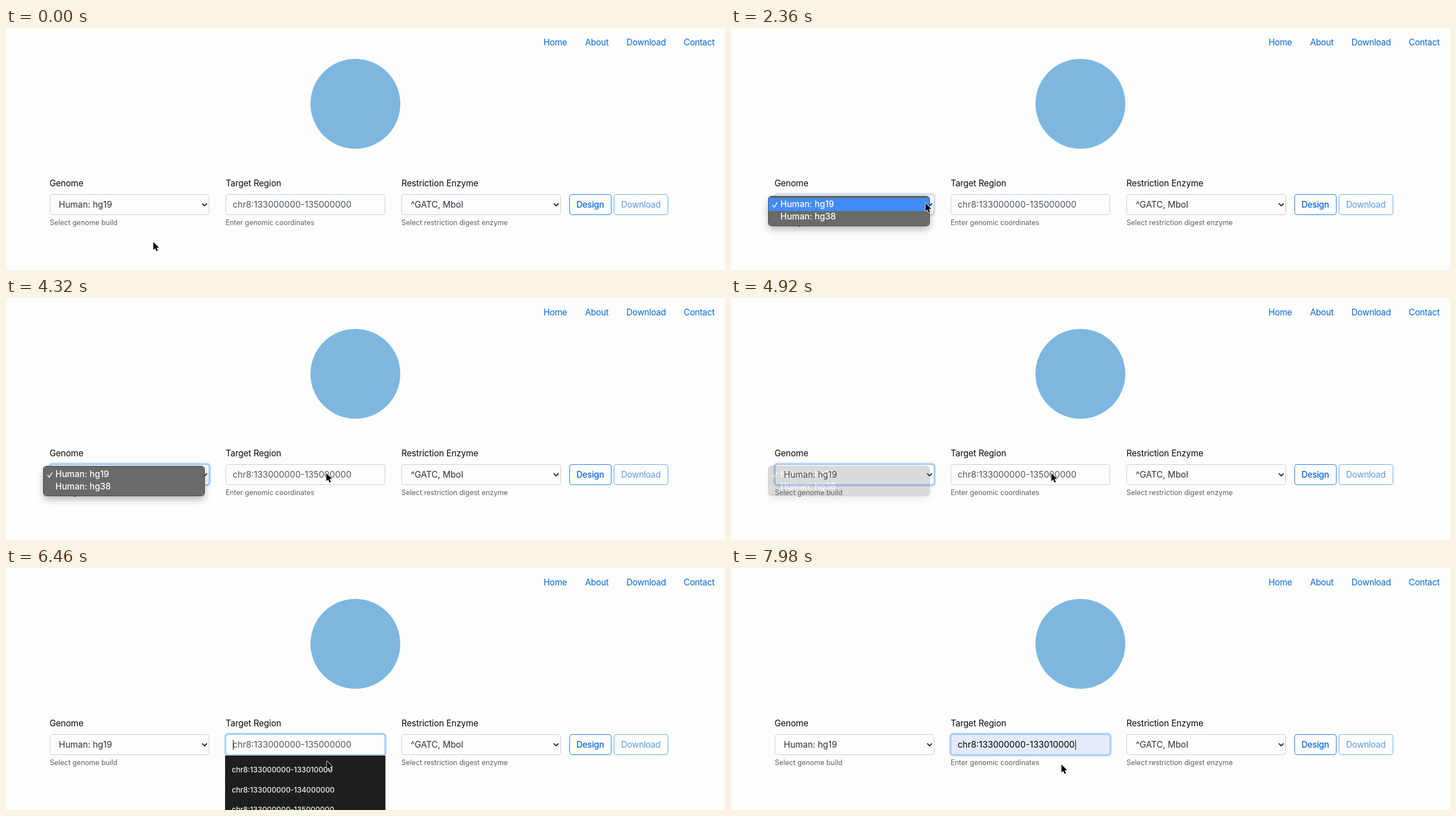
An HTML page for the animation above (8000 ms loop, 1280x431 px).

```html
<!DOCTYPE html>
<html lang="en">
<head>
<meta charset="utf-8">
<title>Probe design form</title>
<style>
  html, body { margin: 0; width: 100%; height: 100%; overflow: hidden; background: #fdfdfc; }
  svg { display: block; width: 100vw; height: 100vh; }
  text { font: 15.3px Inter, "Liberation Sans", sans-serif; letter-spacing: -.007em; fill: #07090c; white-space: pre; }
  .link { fill: #0668dc; letter-spacing: -.018em; }
  .strong { font-weight: 500; }
  .value { font-size: 15.4px; letter-spacing: 0; fill: #2c3238; }
  .hint { font-size: 12.5px; letter-spacing: -.02px; fill: #5a626b; }
  .placeholder { fill: #50575f; }
  .typed { fill: #000; }
  .item { font-size: 13px; font-weight: 500; letter-spacing: 0; fill: #f1f1f1; }
  .menu text { fill: #fff; font-weight: 500; letter-spacing: 0; }
  .box { fill: #fdfdfe; stroke: #c6ccd8; }
  .button { fill: none; stroke: #167df0; }
  .disabled { opacity: .65; }
  .line { fill: none; stroke-width: 2; stroke-linecap: round; stroke-linejoin: round; }

  /* every part shares one 8 s loop; 1% is 80 ms */
  .part { animation: 8s linear infinite; }
  .hard { animation-timing-function: step-end; }
  .pointer { animation-name: travel; animation-timing-function: ease-in-out; }
  .genome-focus { animation-name: genome-focus; }
  .region-focus { animation-name: region-focus; }
  .menu { animation-name: menu; }
  .marked { animation-name: marked; }
  .list { animation-name: list; }
  .empty { animation-name: empty; }
  .chosen { animation-name: chosen; }
  .waiting { animation-name: waiting; }
  .caret { animation: blink 1s step-end -.58s infinite; }

  @keyframes travel {
    0%, 1% { transform: translate(262px, 381px); }
    10%, 14% { transform: translate(330px, 323px); }
    20%, 41.5% { transform: translate(346px, 312px); }
    51%, 74% { transform: translate(570px, 312px); }
    79%, 84% { transform: translate(571px, 344px); }
    92%, 100% { transform: translate(588px, 350px); }
  }
  @keyframes genome-focus {
    0%, 28.75% { opacity: 0; }
    30.6%, 67.75% { opacity: 1; }
    69.6%, 100% { opacity: 0; }
  }
  @keyframes region-focus {
    0%, 67.75% { opacity: 0; }
    69.6%, 100% { opacity: 1; }
  }
  @keyframes menu {
    0%, 28.49% { opacity: 0; }
    28.5%, 60.25% { opacity: 1; }
    61.5% { opacity: .24; }
    63%, 100% { opacity: 0; }
  }
  @keyframes marked { 0% { opacity: 1; } 42.5%, 100% { opacity: 0; } }
  @keyframes list { 0% { opacity: 0; } 69.5% { opacity: 1; } 96.25%, 100% { opacity: 0; } }
  @keyframes empty { 0% { opacity: 1; } 96.25%, 100% { opacity: 0; } }
  @keyframes chosen { 0% { opacity: 0; } 96.25%, 100% { opacity: 1; } }
  @keyframes waiting { 0% { opacity: 0; } 67.75% { opacity: 1; } 96.25%, 100% { opacity: 0; } }
  @keyframes blink { 0% { opacity: 1; } 50%, 100% { opacity: 0; } }
</style>
</head>
<body>
<svg viewBox="0 0 1280 431">
  <defs>
    <rect id="field" x=".5" y=".5" width="283" height="36" rx="4"/>
    <path id="chevron" class="line" d="M271.8 17l3.7 3.8 3.7-3.8" stroke="#2d3238"/>
    <g id="focus" fill="none">
      <rect x="-1.1" y="-1.1" width="286.2" height="39.2" rx="5.5" stroke="#007bff" stroke-opacity=".26" stroke-width="3.2"/>
      <use href="#field" stroke="#76b5f8"/>
    </g>
    <filter id="soft" x="-20%" y="-50%" width="140%" height="220%">
      <feGaussianBlur stdDeviation="7"/>
    </filter>
    <clipPath id="rounded"><rect x="67" y="300" width="286" height="52" rx="5"/></clipPath>
  </defs>

  <rect width="1280" height="431" fill="#fdfdfc"/>

  <text class="link" x="957" y="31">Home</text>
  <text class="link" x="1031" y="31">About</text>
  <text class="link" x="1104.5" y="31">Download</text>
  <text class="link" x="1206.5" y="31">Contact</text>

  <circle cx="622" cy="135" r="80" fill="#7db7e0"/>

  <text x="77.5" y="282">Genome</text>
  <text x="391" y="282">Target Region</text>
  <text x="704" y="282">Restriction Enzyme</text>

  <g transform="translate(78 296)">
    <use href="#field" class="box"/>
    <use href="#focus" class="part genome-focus"/>
    <use href="#chevron"/>
    <text class="value" x="16" y="24">Human: hg19</text>
    <text class="hint" x="0" y="55">Select genome build</text>
  </g>

  <g transform="translate(391 296)">
    <use href="#field" class="box"/>
    <use href="#field" class="part hard chosen" fill="#e4ebfb"/>
    <use href="#focus" class="part region-focus"/>
    <text class="value placeholder part hard empty" x="12.5" y="24">chr8:133000000-135000000</text>
    <g class="part hard chosen">
      <text class="value typed" x="12.5" y="24">chr8:133000000-133010000</text>
      <rect x="222" y="10" width="1" height="18"/>
    </g>
    <g class="part hard waiting"><rect class="caret" x="13" y="10" width="1" height="18"/></g>
    <text class="hint" x="0" y="55">Enter genomic coordinates</text>
  </g>

  <g transform="translate(704 296)">
    <use href="#field" class="box"/>
    <use href="#chevron"/>
    <text class="value" x="16.5" y="24">^GATC, MboI</text>
    <text class="hint" x="0" y="55">Select restriction digest enzyme</text>
  </g>

  <rect class="button" x="1003.5" y="296.5" width="74" height="36" rx="4"/>
  <text class="link strong" x="1015.5" y="320">Design</text>
  <g class="disabled">
    <rect class="button" x="1082.5" y="296.5" width="96" height="36" rx="4"/>
    <text class="link" x="1095" y="320">Download</text>
  </g>

  <g class="part menu">
    <rect x="67" y="306" width="286" height="52" rx="6" opacity=".3" filter="url(#soft)"/>
    <rect x="67" y="300" width="286" height="52" rx="5" fill="#6b6a69"/>
    <rect class="part hard marked" x="67" y="303" width="286" height="23" fill="#418cf9" clip-path="url(#rounded)"/>
    <rect x="66.5" y="299.5" width="287" height="53" rx="5" fill="none" stroke="#444448"/>
    <path class="line" d="M74.2 315.6l2.8 3.5 5-8" stroke="#fff" style="stroke-width:1.5"/>
    <text x="88" y="319">Human: hg19</text>
    <text x="88" y="341">Human: hg38</text>
  </g>

  <g class="part hard list">
    <path d="M390 334h285.5v97H390z" fill="#1e1e21"/>
    <text class="item" x="402" y="364">chr8:133000000-133010000</text>
    <text class="item" x="402" y="399.5">chr8:133000000-134000000</text>
    <text class="item" x="402" y="435">chr8:133000000-135000000</text>
  </g>

  <g class="part pointer">
    <path d="M.3 0v14.2l3.2-3 2.3 5.3 2.5-1.1-2.3-5.1h4.5z" stroke="#fff" stroke-width="1.6" stroke-linejoin="round" paint-order="stroke"/>
  </g>
</svg>
</body>
</html>
```
